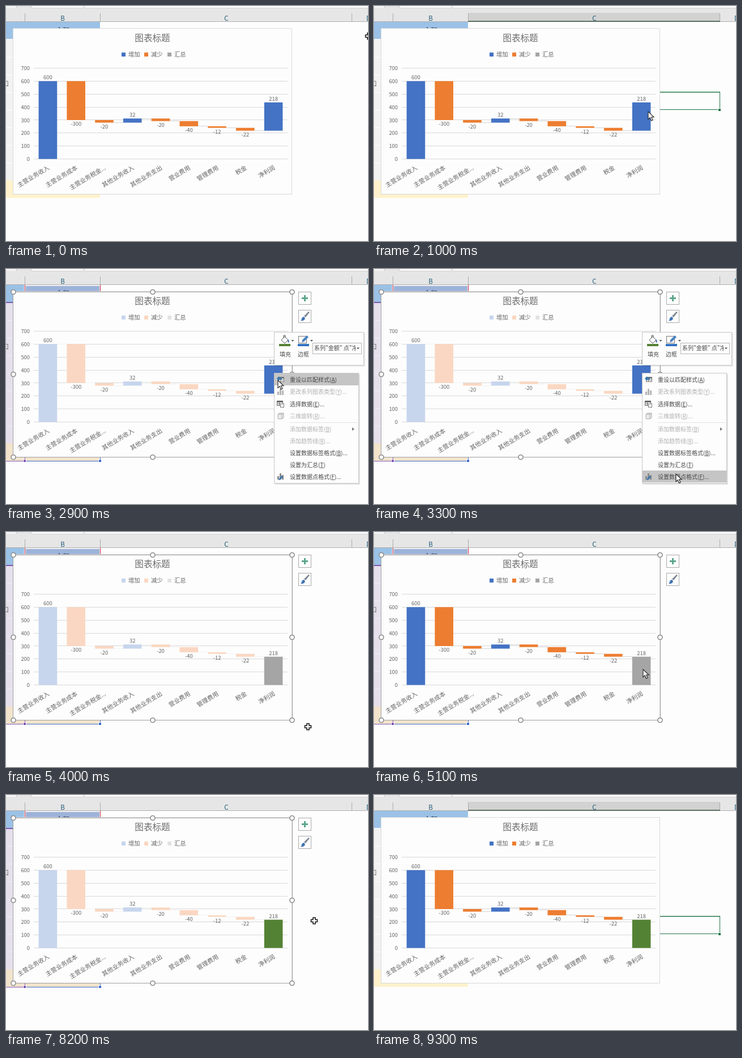
Write an HTML page that moves like this. It is 639 px wide and 414 px high and loops after 9.7 s.

```html
<!DOCTYPE html>
<html lang="zh">
<head>
<meta charset="utf-8">
<title>Waterfall chart</title>
<style>
html, body { margin: 0; width: 100%; height: 100%; overflow: hidden; background: #fdfdfd; }
svg { display: block; }
text { font-family: "Noto Sans CJK SC", "Noto Sans CJK", "Noto Sans", sans-serif; fill: #636363; }
rect, line { shape-rendering: crispEdges; }
.bar { shape-rendering: auto; }
.title { font-size: 15.6px; fill: #6c6c6c; }
.num { font-size: 9.4px; }
.leg { font-size: 10.3px; }
.cat { font-size: 10.6px; }
.mid { text-anchor: middle; }
.end { text-anchor: end; }
.item { font-size: 10px; fill: #484848; }
.off { fill: #b0b0b0; }
.col { font-size: 11.5px; fill: #1f5a78; }
</style>
</head>
<body>
<svg id="stage" width="639" height="414" viewBox="0 0 639 414"></svg>
<script>
const LOOP = 9700;
const BLUE = '#4472c4', ORANGE = '#ed7d31', GRAY = '#a5a5a5', GREEN = '#548235';
const PALE = { [BLUE]: '#c7d5ed', [ORANGE]: '#fad7c2', [GRAY]: '#e3e3e3' };
const PAPER = '#fdfdfd', PURPLE = '#7e57b0', ROYAL = '#3a6cc8', RED = '#d03545';

const rect = (x, y, w, h, fill, more = '') =>
  `<rect x="${x}" y="${y}" width="${w}" height="${h}" fill="${fill}" ${more}/>`;
const frame = (x, y, w, h, stroke, fill = PAPER) =>
  rect(x + .5, y + .5, w - 1, h - 1, fill, `stroke="${stroke}"`);
const line = (x1, y1, x2, y2, stroke) =>
  `<line x1="${x1}" y1="${y1}" x2="${x2}" y2="${y2}" stroke="${stroke}"/>`;
const text = (x, y, s, cls = '', more = '') => `<text x="${x}" y="${y}" class="${cls}" ${more}>${s}</text>`;
const path = (d, fill, more = '') => `<path d="${d}" fill="${fill}" ${more}/>`;
const group = (id, body) => `<g id="${id}">${body}</g>`;
const drop = (x, y) => path(`M${x - 2.5} ${y - 1}h5l-2.5 3z`, '#555');
const grip = (x, y, color) => rect(x - 3, y - 3, 6, 6, '#fff') + rect(x - 2, y - 2, 4, 4, color);

// Worksheet
const rows = [90, 121, 152, 183, 214, 245, 276];
const sheet = rect(0, 28, 166, 31, '#9bc2e6') + rect(0, 59, 33, 248, '#f2f2f2') +
  rect(0, 58, 166, 1, '#fff') + rows.map(y => rect(0, y, 33, 1, '#fff')).join('') +
  rect(0, 307, 166, 31, '#fff2cc');

const ranges = rect(0, 59, 33, 248, '#e5e0ec') + rows.map(y => rect(0, y, 33, 1, '#f0edf5')).join('') +
  rect(0, 307, 166, 31, '#f2e3cc') + rect(32, 28, 136, 31, '#f3f0f2') + rect(35, 30, 130, 29, '#9db3d9') +
  rect(0, 58, 33, 2, PURPLE) + rect(0, 338, 33, 1, PURPLE) + rect(33, 332, 1, 6, PURPLE) +
  rect(33, 338, 133, 1, ROYAL) + rect(166, 332, 1, 6, ROYAL) +
  rect(33, 28, 1, 13, RED) + rect(166, 28, 1, 13, RED) +
  grip(33, 338, PURPLE) + grip(166, 338, ROYAL);

const cellText = text(100, 48, '金额', 'mid', 'font-size="12" style="fill:#23405f"') +
  text(-6, 141, '口', '', 'font-size="11"');

const header = rect(0, 0, 639, 28, '#e6e6e6') + rect(0, 0, 18, 3, '#f5f5f5') +
  rect(45, 0, 92, 3, '#fff') + rect(139, 0, 500, 3, '#fff') +
  [18, 44, 137].map(x => rect(x, 0, 1, 3, '#c6c6c6')).join('') +
  rect(45, 3, 92, 1, '#cfcfcf') + rect(139, 3, 500, 1, '#cfcfcf') +
  group('colOn', rect(167, 12, 443, 15, '#d2d2d2')) +
  [33, 166, 610].map(x => rect(x, 13, 1, 15, '#ababab')).join('') +
  rect(0, 27, 639, 1, '#b0b0b0') + group('colLine', rect(166, 26, 445, 2, '#5d6f64')) +
  text(100, 25.5, 'B', 'col mid') + text(389, 25.5, 'C', 'col mid') + text(636, 25.5, 'D', 'col');

const cell = group('cell', frame(166, 0, 445, 32, '#217346', 'none') +
  rect(167, 1, 443, 1, '#217346', 'opacity=".45"') + grip(610, 32, '#217346'));

// Chart
const names = ['主营业务收入', '主营业务成本', '主营业务税金...', '其他业务收入', '其他业务支出',
  '营业费用', '管理费用', '税金', '净利润'];
const values = [600, -300, -20, 32, -20, -40, -12, -22, 218];
const STEP = 448 / 9, BAR = 32.6;
const yOf = v => 269.5 - v * 160 / 700;
const midX = i => 49 + STEP * (i + .5);
const legend = [['增加', BLUE, 204], ['减少', ORANGE, 244], ['汇总', GRAY, 285]];

function chartBody(dim, net) {
  const tone = c => dim ? PALE[c] : c;
  const link = dim ? '#f2f2f2' : '#d4d4d4';
  let out = '', sum = 0;
  for (const [label, color, x] of legend)
    out += rect(x, 82, 7, 7, tone(color)) + text(x + 12, 89, label, 'leg');
  values.forEach((v, i) => {
    const last = i === 8;
    const from = last && net !== BLUE ? 0 : sum, to = from + v;
    const top = yOf(Math.max(from, to)), bottom = yOf(Math.min(from, to));
    const x = midX(i) - BAR / 2;
    if (!last) out += line(x + BAR, yOf(to), x + STEP, yOf(to), link);
    out += rect(x, top, BAR, bottom - top, last ? net : tone(v > 0 ? BLUE : ORANGE), 'class="bar"');
    out += text(midX(i), v > 0 ? top - 3 : bottom + 10.3, v, 'num mid');
    sum += v;
  });
  return out;
}

let chart = frame(12, 39, 493, 293, '#d9d9d9') + text(258.5, 61.5, '图表标题', 'title mid');
for (let v = 0; v <= 700; v += 100)
  chart += line(49, yOf(v), 497, yOf(v), '#d9d9d9') + text(42, yOf(v) + 3.6, v, 'num end');
names.forEach((n, i) => {
  chart += text(0, 0, n, 'cat end', `transform="translate(${midX(i) + 3.5} 287) rotate(-31)"`);
});

const xs = [13, 259, 505], ys = [41, 186, 332];
const knobs = xs.flatMap((x, i) => ys.map((y, j) => i === 1 && j === 1 ? '' :
  `<circle cx="${x}" cy="${y - .5}" r="4" fill="#fff" stroke="#8a8a8a" stroke-width="1.6"/>`)).join('');
const selection = frame(12, 40, 494, 292, '#a0a0a0', 'none') + knobs +
  frame(516, 40, 23, 23, '#ababab') + frame(516, 72, 23, 23, '#ababab') +
  rect(526, 46, 3, 11, '#5ea78b') + rect(522, 50, 11, 3, '#5ea78b') +
  path('M526 83l8-8 2 1-7 9z', '#7d8793') +
  path('M520 91q2-1 2-4 2-4 5-2 2 3-1 5-3 2-6 1z', '#3f74b5');

// Context menu
const items = [['重设以匹配样式', 'A', '', 195], ['更改系列图表类型', 'Y', '...', 216.5, 1],
  ['选择数据', 'E', '...', 238], ['三维旋转', 'R', '...', 259, 1], ['添加数据标签', 'B', '', 282, 1],
  ['添加趋势线', 'R', '...', 303, 1], ['设置数据标签格式', 'B', '...', 324],
  ['设置为汇总', 'T', '', 345], ['设置数据点格式', 'F', '...', 366]];
const grid = (x, y, c) => frame(x, y, 11, 9, c, '#fff') + rect(x, y, 11, 3, c) +
  rect(x + 4, y, 1, 9, c) + rect(x, y + 5, 11, 1, c);
const bars = (x, y, c) => rect(x, y + 5, 3, 6, c) + rect(x + 4, y, 3, 11, c) + rect(x + 8, y + 3, 3, 8, c);
const icons = grid(480, 190, '#777') + path('M478 193l4-4v2.5h5v3h-5v2.5z', '#2e75b6') +
  bars(479, 211, '#b5b5b5') + grid(478, 232, '#666') + frame(484, 237, 7, 7, '#777', '#fff') +
  path('M480 256l3-2h7v8l-3 2h-7z', '#ececec', 'stroke="#aaa"') +
  path('M480 256h7v8m0-8l3-2', 'none', 'stroke="#aaa"') +
  bars(479, 360, '#8a8a8a') + path('M481 371l6-7 2 2-6 6z', '#2e75b6');
const menu = rect(475, 185, 150, 195, '#000', 'opacity=".1"') + frame(473, 183, 150, 195, '#c6c6c6') +
  rect(500, 270, 121, 1, '#e1e1e1') + rect(474, 0, 148, 21, '#c5c5c5', 'id="hover"') + icons +
  items.map(([s, key, tail, y, off]) => text(501, y + 3.7,
    `${s}(<tspan text-decoration="underline">${key}</tspan>)${tail}`, off ? 'item off' : 'item')).join('') +
  path('M611 279l4 3-4 3z', '#777');
const toolbar = rect(475, 113, 159, 59, '#000', 'opacity=".08"') + frame(473, 111, 159, 59, '#c6c6c6') +
  path('M486 125l6-6 6 6-6 6z', '#fff', 'stroke="#555"') + path('M490 122v-5h3v4', 'none', 'stroke="#555"') +
  path('M498 124q3 3 1 6-3-2-1-6z', BLUE) + rect(482, 132, 20, 4, GREEN) + drop(506, 126) +
  frame(516, 118, 15, 13, '#777') + path('M522 129l1-4 8-8 3 3-8 8z', '#4a83c4') +
  rect(515, 132, 20, 4, '#2f6fc0') + drop(539.5, 126) +
  text(493, 154, '填充', 'item mid') + text(525, 154, '边框', 'item mid') +
  frame(541, 130, 87, 20, '#b5b5b5') +
  text(544, 143, '系列"金额" 点"净', 'item', 'clip-path="url(#box)"') + drop(621.5, 139.5);

const arrow = group('arrow', path('M0 0V13.5L3.2 10.6 5.5 16 8 15 5.6 9.8H10Z', '#fff',
  'stroke="#222" stroke-width="1.1"'));
const cross = group('cross', path('M-2-5.5h4v3.5h3.5v4h-3.5v3.5h-4v-3.5h-3.5v-4h3.5z', '#fff',
  'stroke="#111" stroke-width="1.5"'));

document.getElementById('stage').innerHTML =
  '<clipPath id="box"><rect x="542" y="131" width="75" height="18"/></clipPath>' +
  sheet + group('ranges', ranges) + cellText + header + cell + chart +
  group('series', '') + group('selection', selection) + group('menu', menu + toolbar) + arrow + cross;

// Timeline: time, pointer x, y and shape
const moves = [
  [0, 640, 53, 'cross'], [100, 606, 85, 'cross'], [200, 573, 117, 'cross'], [300, 549, 143, 'cross'],
  [400, 540, 160, 'cross'], [500, 532, 170, 'cross'], [600, 525, 175, 'cross'],
  [900, 505, 182, 'cross'], [1000, 484, 186, 'arrow'], [1100, 473, 183, 'arrow'],
  [2900, 480, 196, 'arrow'], [3000, 495, 240, 'arrow'], [3100, 512, 292, 'arrow'],
  [3200, 526, 340, 'arrow'], [3300, 533, 361, 'arrow'], [3500, 533, 352, 'arrow'], [3600, 533, 342, 'arrow'],
  [4000, 533, 343, 'cross'], [4600, 512, 306, 'arrow'], [4700, 488, 264, 'arrow'], [4800, 475, 242, 'arrow'],
  [5900, 370, 176, 'arrow'], [6000, 225, 98, 'arrow'], [6100, 113, 45, 'arrow'], [6200, 0, 0, ''],
  [7600, 230, 40, 'arrow'], [7700, 275, 72, 'arrow'], [7800, 340, 112, 'arrow'], [7900, 415, 156, 'arrow'],
  [8000, 485, 194, 'arrow'], [8100, 528, 214, 'cross'], [8200, 544, 221.5, 'cross'],
  [9000, 566, 178, 'cross'], [9100, 598, 112, 'cross'], [9200, 632, 38, 'cross'], [9300, 0, 0, '']
];
const at = (table, t) => table.findLast(row => row[0] <= t);
const $ = id => document.getElementById(id);
const show = (id, on) => { $(id).style.display = on ? '' : 'none'; };
const within = (t, a, b) => t >= a && t < b;
let drawn = '';

function draw(t) {
  const picked = within(t, 1200, 8400);
  const dim = within(t, 1700, 5000) || within(t, 5600, 8400);
  const net = t < 4000 ? BLUE : t < 7200 ? GRAY : GREEN;
  const cellY = within(t, 500, 1200) ? 152 : t >= 8400 ? 214 : 0;
  const open = within(t, 2300, 4000);
  const [, x, y, kind] = at(moves, t);

  if (drawn !== dim + net) {
    $('series').innerHTML = chartBody(dim, net);
    drawn = dim + net;
  }
  show('ranges', picked);
  show('selection', picked);
  for (const id of ['cell', 'colOn', 'colLine']) show(id, cellY);
  $('cell').setAttribute('transform', `translate(0 ${cellY - 1})`);

  show('menu', open);
  const over = items.find(i => Math.abs(i[3] - y) <= 10.8);
  show('hover', open && t >= 2900 && over);
  if (over) $('hover').setAttribute('y', over[3] - 11);

  for (const id of ['arrow', 'cross']) {
    show(id, id === kind);
    $(id).setAttribute('transform', `translate(${x} ${y})`);
  }
}

const start = performance.now();
function tick(now) {
  draw(Math.max(0, now - start) % LOOP);
  requestAnimationFrame(tick);
}
draw(0);
requestAnimationFrame(tick);
</script>
</body>
</html>
```
